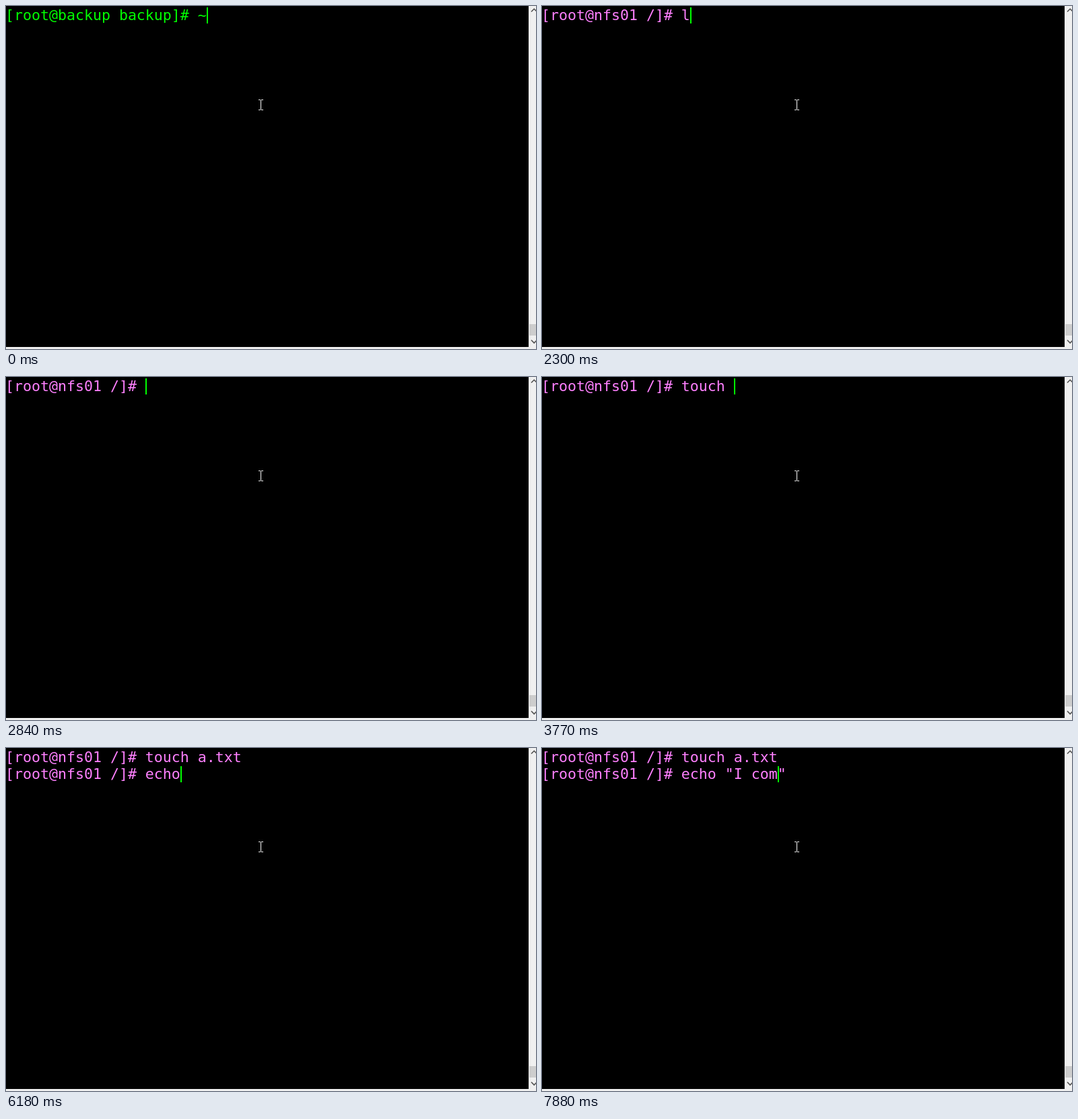
Animation, 787 px wide and 510 px high, one loop 8000 ms. Source, as an HTML page:

```html
<!DOCTYPE html>
<html lang="en">
<head>
<meta charset="utf-8">
<title>Terminal session</title>
<style>
  html, body { margin: 0; width: 100%; height: 100%; overflow: hidden; background: #000; }
  #stage { position: relative; width: 787px; height: 510px; overflow: hidden; background: #000; }
  #screen {
    position: absolute; left: -1px; top: 1px; margin: 0;
    font: 21.592px/25px "DejaVu Sans Mono", monospace;
    font-variant-ligatures: none;
  }
  #screen div { height: 25px; }
  .backup { color: #0f0; }
  .nfs { color: #ff80ff; }
  .dirs { color: #2a2af0; font-weight: bold; }
  .sticky {
    color: #333; font-weight: normal; padding-bottom: 1px;
    background: linear-gradient(transparent 1px, #008000 1px);
  }
  #caret { position: absolute; width: 2px; height: 24px; background: #0f0; }
  svg { position: absolute; left: 0; top: 0; }
</style>
</head>
<body>
<div id="stage">
  <pre id="screen"></pre>
  <div id="caret"></div>
  <svg width="787" height="510" fill="none">
    <path d="M776 0H787V510H0V507H776Z" fill="#f0f0f0"/>
    <path d="M777 473H787V490H777Z" fill="#cdcdcd"/>
    <path d="M780 8.5L784.2 4.3L788.4 8.5M780 496.8L784.2 501L788.4 496.8" stroke="#505050" stroke-width="1.6"/>
    <path d="M375 139.5H378M379 139.5H382M378.5 140V154M375 154.5H378M379 154.5H382" stroke="#fff"/>
  </svg>
</div>
<script>
const LOOP = 8000, CELL = 13, ROW = 25;
const backup = '[root@backup backup]# ';
const nfs = '[root@nfs01 /]# ';
const listing = [
  'beifen  dev   lib         media  proc  selinux  tmp',
  'bin     etc   lib64       mnt    root  srv      usr',
  'boot    home  lost+found  opt    sbin  sys      var'
].join('\n');
const touched = nfs + 'touch a.txt\n';

// Screens spread evenly from start to end; "|" marks the caret.
const burst = (start, end, screens) => screens.map((text, i) =>
  ({ at: start + (end - start) * i / Math.max(1, screens.length - 1), text }));

// Every stage of typing a word after a fixed head.
const typed = (head, word, tail = '') =>
  [...word].map((_, i) => head + word.slice(0, i + 1) + '|' + tail);

const steps = [
  ...burst(0, 0, [backup + '~|']),
  ...burst(840, 1380, [backup + '|', ...typed(backup, 'ls'),
    backup + 'ls\n' + backup, backup + 'ls\n' + backup + '|']),
  ...burst(1990, 1990, [nfs + '|']),
  ...burst(2300, 2530, [...typed(nfs, 'ls'), nfs + 'ls\n' + listing + '\n' + nfs + '|']),
  ...burst(2840, 2840, [nfs + '|']),
  ...burst(3220, 3770, typed(nfs, 'touch ')),
  ...burst(4230, 5160, [...typed(nfs + 'touch ', 'a.txt'), touched + '|']),
  ...burst(5250, 5250, [touched + nfs + '|']),
  ...burst(5800, 6180, typed(touched + nfs, 'echo')),
  ...burst(6260, 6810, [...typed(touched + nfs + 'echo', ' ""'), touched + nfs + 'echo "|"']),
  ...burst(7270, 7880, typed(touched + nfs + 'echo "', 'I com', '"'))
];

const screen = document.getElementById('screen');
const caret = document.getElementById('caret');
let shown;

function lineHtml(line) {
  const kind = line.startsWith(nfs) ? 'nfs' : line.startsWith(backup) ? 'backup' : 'dirs';
  const html = kind === 'dirs' ? line.replace('tmp', '<span class="sticky">tmp</span>') : line;
  return `<div class="${kind}">${html}</div>`;
}

function show({ text }) {
  screen.innerHTML = text.replace('|', '').split('\n').map(lineHtml).join('');
  const index = text.indexOf('|');
  caret.hidden = index < 0;
  const before = text.slice(0, Math.max(0, index)).split('\n');
  caret.style.left = before.at(-1).length * CELL - 1 + 'px';
  caret.style.top = (before.length - 1) * ROW + 2 + 'px';
}

const origin = performance.now();
function tick() {
  const time = (performance.now() - origin) % LOOP;
  const step = steps.findLast(s => s.at <= time);
  if (step !== shown) show(shown = step);
  requestAnimationFrame(tick);
}
tick();
</script>
</body>
</html>
```
